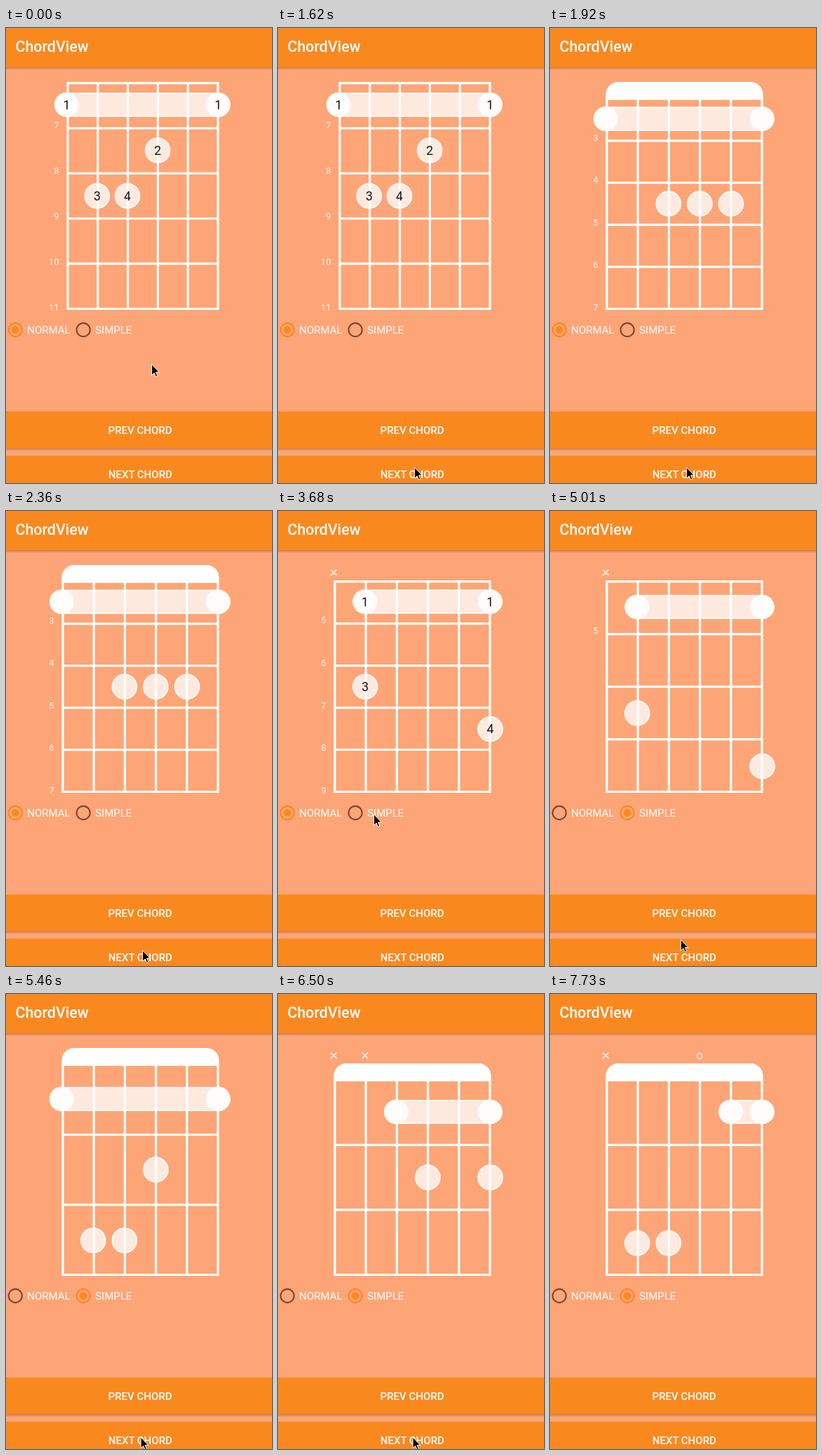
An HTML page for the animation above (8070 ms loop, 379 px wide and 649 px high).

```html
<!DOCTYPE html>
<html lang="en">
<head>
<meta charset="utf-8">
<title>ChordView</title>
<style>
  html, body { margin: 0; width: 100%; height: 100%; overflow: hidden; background: #fda576; }
  svg { display: block; width: 379px; height: 649px; font-family: Roboto, sans-serif; fill: #fff; }
  .bar { fill: #f9891f; }
  .title { font-size: 21.4px; font-weight: 500; }
  .btn { font-size: 15px; font-weight: 500; text-anchor: middle; }
  .opt { font-size: 15px; }
  .ring { fill: none; stroke: #7b4b35; stroke-width: 2.1; }
  .on .ring { stroke: #f9891f; }
  .dot { fill: none; }
  .on .dot { fill: #f9891f; }
  .grid { fill: none; stroke: #fff; stroke-width: 3.2; }
  .spot { fill: #fff; fill-opacity: .76; stroke: #fffafa; stroke-width: 2; }
  .end { fill: #fffcfc; }
  .num { fill: #111; font-size: 17.5px; text-anchor: middle; }
  .fret { fill: #fff1e8; font-size: 13.2px; text-anchor: end; }
  .open { font-size: 13.5px; text-anchor: middle; }
  .mute { fill: none; stroke: #fff; stroke-width: 1.4; }
</style>
</head>
<body>
<svg viewBox="0 0 379 649">
  <defs>
    <linearGradient id="shade" x2="0" y2="1">
      <stop offset="0" stop-color="#804020" stop-opacity=".42"/>
      <stop offset="1" stop-color="#804020" stop-opacity="0"/>
    </linearGradient>
  </defs>
  <rect width="379" height="649" fill="#fda576"/>
  <rect class="bar" width="379" height="56"/>
  <rect y="56" width="379" height="4" fill="url(#shade)"/>
  <text class="title" x="13.5" y="33.5">ChordView</text>
  <g id="chord"></g>
  <g id="normal">
    <circle class="ring" cx="13.3" cy="430.5" r="9.6"/>
    <circle class="dot" cx="13.3" cy="430.5" r="5.4"/>
    <text class="opt" x="30.3" y="436">NORMAL</text>
  </g>
  <g id="simple">
    <circle class="ring" cx="110.2" cy="430.5" r="9.6"/>
    <circle class="dot" cx="110.2" cy="430.5" r="5.4"/>
    <text class="opt" x="127.2" y="436">SIMPLE</text>
  </g>
  <rect class="bar" y="547" width="379" height="52.5"/>
  <rect y="599.5" width="379" height="4" fill="url(#shade)"/>
  <text class="btn" x="191" y="579">PREV CHORD</text>
  <rect class="bar" y="610" width="379" height="39"/>
  <text class="btn" x="191.3" y="641.8">NEXT CHORD</text>
  <path id="cursor" d="M.6 .8V16.4L4.2 13L6.6 18.4L9 17.4L6.6 12H11.4Z" fill="#000" stroke="#fff"/>
</svg>
<script>
const LOOP = 8070, RIGHT = 302, BOTTOM = 400.5, STEP = 148;
const $ = id => document.getElementById(id);

// barre: [from, to] strings; dots: [string, row, finger]
const high = { rows: 5, first: 7, barre: [0, 5], finger: 1, dots: [[3, 2, 2], [1, 3, 3], [2, 3, 4]] };
const third = { rows: 5, first: 3, nut: 1, barre: [0, 5], dots: [[2, 3], [3, 3], [4, 3]] };
const fifth = { rows: 5, first: 5, top: 'x', barre: [1, 5], finger: 1, dots: [[1, 3, 3], [5, 4, 4]] };
const plain = { rows: 4, first: 5, single: 1, top: 'x', barre: [1, 5], dots: [[1, 3], [5, 4]] };
const full = { rows: 3, nut: 1, barre: [0, 5], dots: [[3, 2], [1, 3], [2, 3]] };
const five = { rows: 3, nut: 1, top: 'x', barre: [1, 5], dots: [[2, 3], [3, 3], [4, 3]] };
const four = { rows: 3, nut: 1, top: 'xx', barre: [2, 5], dots: [[3, 2], [5, 2]] };
const last = { rows: 3, nut: 1, top: 'x  o', barre: [4, 5], dots: [[1, 3], [2, 3]] };

const chords = [[0, high], [1910, third], [2650, fifth], [4120, plain],
  [5310, full], [5910, five], [6500, four], [6950, last]];

// [start, steps, x, y]
const moves = [[0, 1, 207, 479], [140, 8, 194, 626], [3230, 4, 136, 432],
  [4420, 5, 191.5, 631.5], [7580, 1, 238, 638], [7730, 1, 250, 670]];

const text = (cls, x, y, s) => `<text class="${cls}" x="${x}" y="${y}">${s}</text>`;
const circle = (cls, x, y, r) => `<circle class="${cls}" cx="${x}" cy="${y}" r="${r}"/>`;

function draw(c) {
  const left = c.first + c.rows > 10 ? 88 : 81;
  const gap = (RIGHT - left) / 5;
  const head = c.top ? 99 : 77;
  const edge = head + (c.nut ? 22.3 : 0);
  const line = edge + 1.6, rowGap = (BOTTOM - line) / c.rows;
  const pitch = (402 - edge) / c.rows;
  const sx = i => left - 1.6 + i * (RIGHT + 1.8 - left) / 5;
  const ry = row => edge + (row - .5) * pitch;
  let out = '', d = `M${left} ${line}H${RIGHT}V${BOTTOM}H${left}Z`;

  for (let i = 1; i < 5; i++) d += `M${left + i * gap} ${line}V${BOTTOM}`;
  for (let i = 1; i < c.rows; i++) d += `M${left} ${line + i * rowGap}H${RIGHT}`;
  out += `<path class="grid" d="${d}"/>`;
  if (c.nut) out += `<path d="M${left - 1.6} ${head + 24.3}v-6.3a18 18 0 0 1 18 -18H${RIGHT - 16.4}a18 18 0 0 1 18 18v6.3z"/>`;

  if (c.first) {
    const count = c.single ? 1 : c.rows;
    for (let i = 0; i < count; i++)
      out += text('fret', left - 12.3, edge + (i + 1) * pitch + .7, c.first + i);
  }
  [...c.top || ''].forEach((m, i) => {
    if (m === 'x') out += `<path class="mute" d="M${sx(i) - 4.2} 83.6l8.4 8.4m0 -8.4l-8.4 8.4"/>`;
    if (m === 'o') out += text('open', sx(i), 93, 'O');
  });

  const [a, b] = c.barre.map(sx), y = ry(1);
  out += `<rect class="spot" x="${a - 16.5}" y="${y - 16.2}" width="${b - a + 33}" height="32.4" rx="16.2"/>`;
  for (const x of [a, b]) {
    out += circle('end', x, y, 17.5);
    if (c.finger) out += text('num', x, y + 6.2, c.finger);
  }
  for (const [s, row, n] of c.dots) {
    out += circle('spot', sx(s) + .3, ry(row), 17.3);
    if (n) out += text('num', sx(s) + .3, ry(row) + 6.2, n);
  }
  return out;
}

function pointer(t) {
  let [, , x, y] = moves[0];
  for (const [start, steps, tx, ty] of moves) {
    if (t < start) break;
    const p = Math.min(1, (Math.floor((t - start) / STEP) + 1) / steps);
    const e = p * p * (3 - 2 * p);
    x += (tx - x) * e;
    y += (ty - y) * e;
  }
  return `translate(${x} ${y})`;
}

let shown;
function frame() {
  const t = performance.now() % LOOP;
  const chord = chords.findLast(([start]) => t >= start)[1];
  if (chord !== shown) {
    $('chord').innerHTML = draw(chord);
    shown = chord;
  }
  const simple = t >= 4120;
  $('normal').classList.toggle('on', !simple);
  $('simple').classList.toggle('on', simple);
  $('cursor').setAttribute('transform', pointer(t));
  requestAnimationFrame(frame);
}
frame();
</script>
</body>
</html>
```
